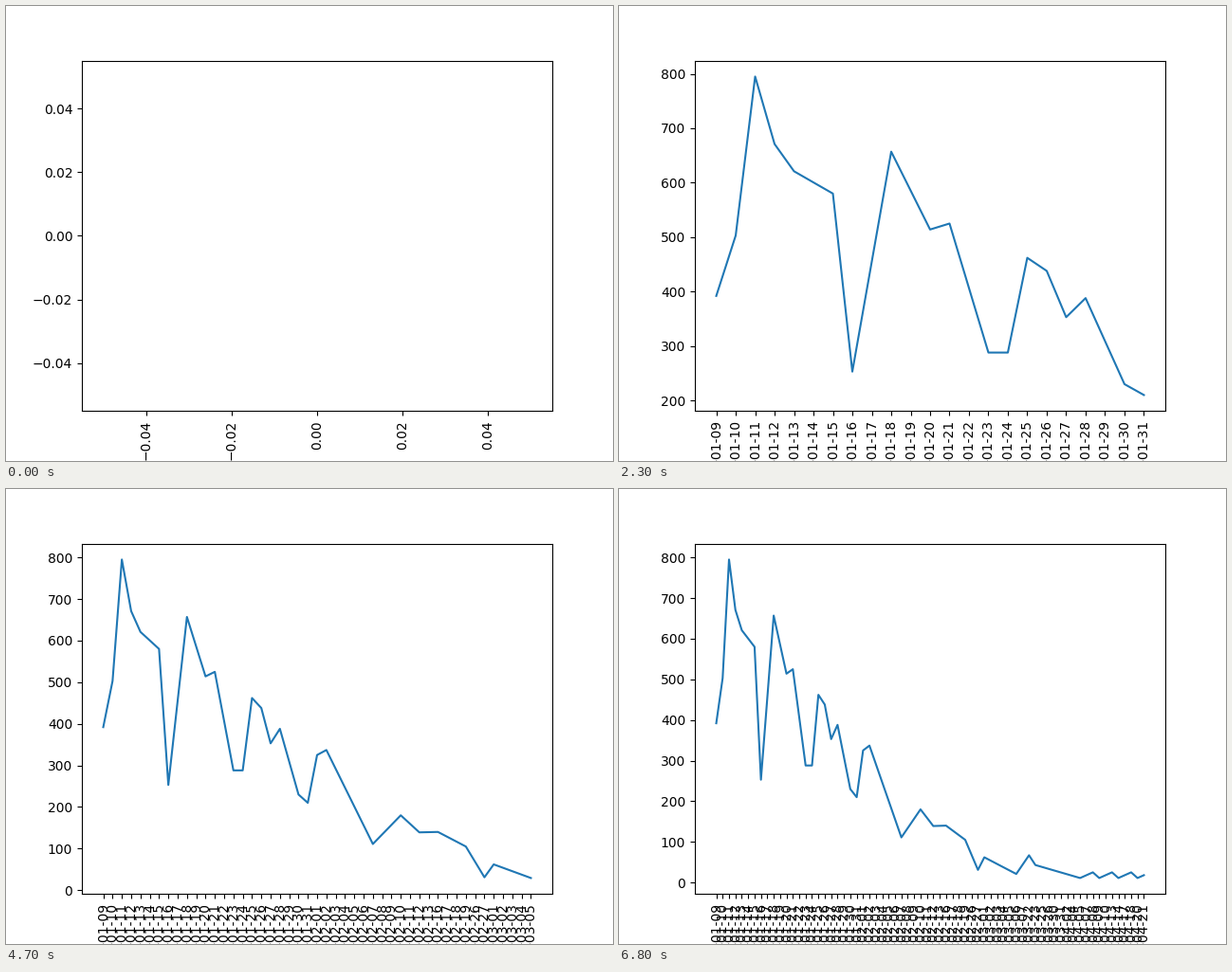
A matplotlib script that plays this animation: 640x480 px, repeating every 6900 ms.

```python
import matplotlib.pyplot as plt
import numpy as np
from matplotlib.animation import FuncAnimation

# Unbroken runs of days with readings: first day and length
runs = {"01-09": 36, "02-16": 4, "02-26": 2, "03-01": 7, "03-22": 2,
        "03-25": 2, "03-30": 2, "04-02": 1, "04-04": 2, "04-07": 4,
        "04-13": 2, "04-17": 2, "04-20": 2}
# The year runs off the bottom edge of the figure
dates = [str(np.datetime64(f"2021-{start}") + k)
         for start, length in runs.items() for k in range(length)]

# Turning points of the curve, straight in between
turns = [(0, 392), (1, 503), (2, 795), (3, 671), (4, 621), (6, 580),
         (7, 253), (9, 657), (11, 514), (12, 525), (14, 288), (15, 288),
         (16, 462), (17, 438), (18, 353), (19, 388), (21, 230), (22, 210),
         (23, 325), (24, 337), (29, 111), (32, 180), (34, 139), (36, 140),
         (39, 105), (41, 31), (42, 62), (47, 21), (49, 67), (50, 43),
         (57, 11)]
xs = np.arange(len(dates))
values = np.interp(xs, *zip(*turns))

# After the last low, small three-reading ripples
since_low = np.maximum(xs - turns[-1][0], 0)
values += 7 * (since_low % 3)

fig, ax = plt.subplots(figsize=(6.4, 4.8), dpi=100)


def draw(n):
    """Plot the first n readings on freshly scaled axes."""
    ax.clear()
    ax.plot(xs[:n], values[:n], color="C0")
    if n:
        ax.set_xticks(xs[:n], dates[:n])
    ax.tick_params(axis="x", rotation=90)


anim = FuncAnimation(fig, draw, frames=len(dates) + 1, interval=100,
                     init_func=lambda: None, repeat=True)
plt.show()
```
